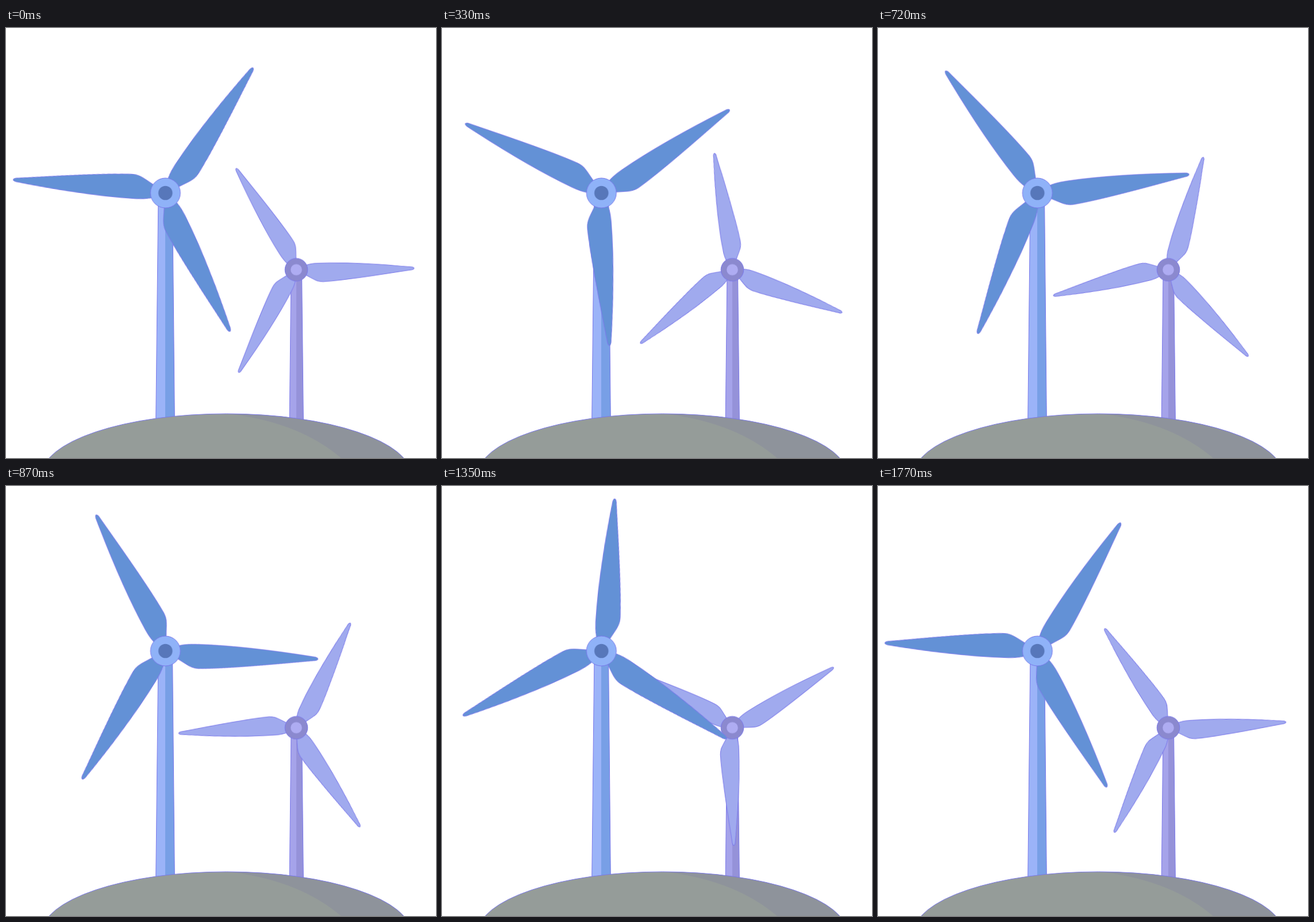
An HTML page for the animation above (1.8 s loop, 748 by 748 pixels).

```html
<!DOCTYPE html>
<html lang="en">
<head>
<meta charset="utf-8">
<title>Wind turbines</title>
<style>
  html, body { margin: 0; width: 100%; height: 100%; overflow: hidden; background: #fff; }
  svg { display: block; width: 100vw; height: 100vh; }
  .line { stroke: #7a78ea; stroke-width: 1; }
  .blade { vector-effect: non-scaling-stroke; }
  .rotor { transform-origin: 0 0; animation: spin 1800ms steps(60, end) infinite; }
  /* three equal blades: a third of a turn closes the loop */
  @keyframes spin {
    from { transform: rotate(0deg); }
    to { transform: rotate(120deg); }
  }
</style>
</head>
<body>
<svg viewBox="0 0 748 748">
  <defs>
    <path id="blade" class="line blade" d="M20-9.5C28-12.5 38-14 50-14.3C100-15.7 170-12.8 261-3Q265.7-2 265.7 0Q265 2.6 260 3.2C200 11.4 120 24.2 64 27.3C48 28.8 42 23.5 22 12.5Z"/>
    <g id="blades">
      <use href="#blade"/>
      <use href="#blade" transform="rotate(120)"/>
      <use href="#blade" transform="rotate(240)"/>
    </g>
    <ellipse id="hill" cx="383.5" cy="779" rx="322" ry="108"/>
    <clipPath id="hillClip"><use href="#hill"/></clipPath>
  </defs>

  <!-- small turbine -->
  <path fill="#a5a3ea" d="M496 425H505V700H493Z"/>
  <path fill="#9592d9" d="M505 425H514.5L517.5 700H505Z"/>
  <path class="line" fill="none" d="M496 425L493 700M514.5 425L517.5 700"/>
  <g transform="translate(505 420.5)">
    <g class="rotor"><use href="#blades" fill="#a0aaee" transform="rotate(-.7) scale(.771)"/></g>
    <circle class="line" r="19.8" fill="#8b89cf"/>
    <circle r="9.8" fill="#aeacf2"/>
  </g>

  <!-- large turbine -->
  <path fill="#9bb3f8" d="M265 290H277V700H260.5Z"/>
  <path fill="#789fe6" d="M277 290H289.5L293.5 700H277Z"/>
  <path class="line" fill="none" d="M265 290L260.5 700M289.5 290L293.5 700"/>
  <g transform="translate(277.3 287)">
    <g class="rotor"><use href="#blades" fill="#6391d6" transform="rotate(65)"/></g>
    <circle class="line" r="26" fill="#8fb2f8"/>
    <circle r="12.3" fill="#5777ba"/>
  </g>

  <!-- hill -->
  <use href="#hill" fill="#959c99"/>
  <path clip-path="url(#hillClip)" fill="#8e939b" d="M375 670Q505 682 583 748H720V660Z"/>
  <use href="#hill" class="line" fill="none"/>
</svg>
</body>
</html>
```
